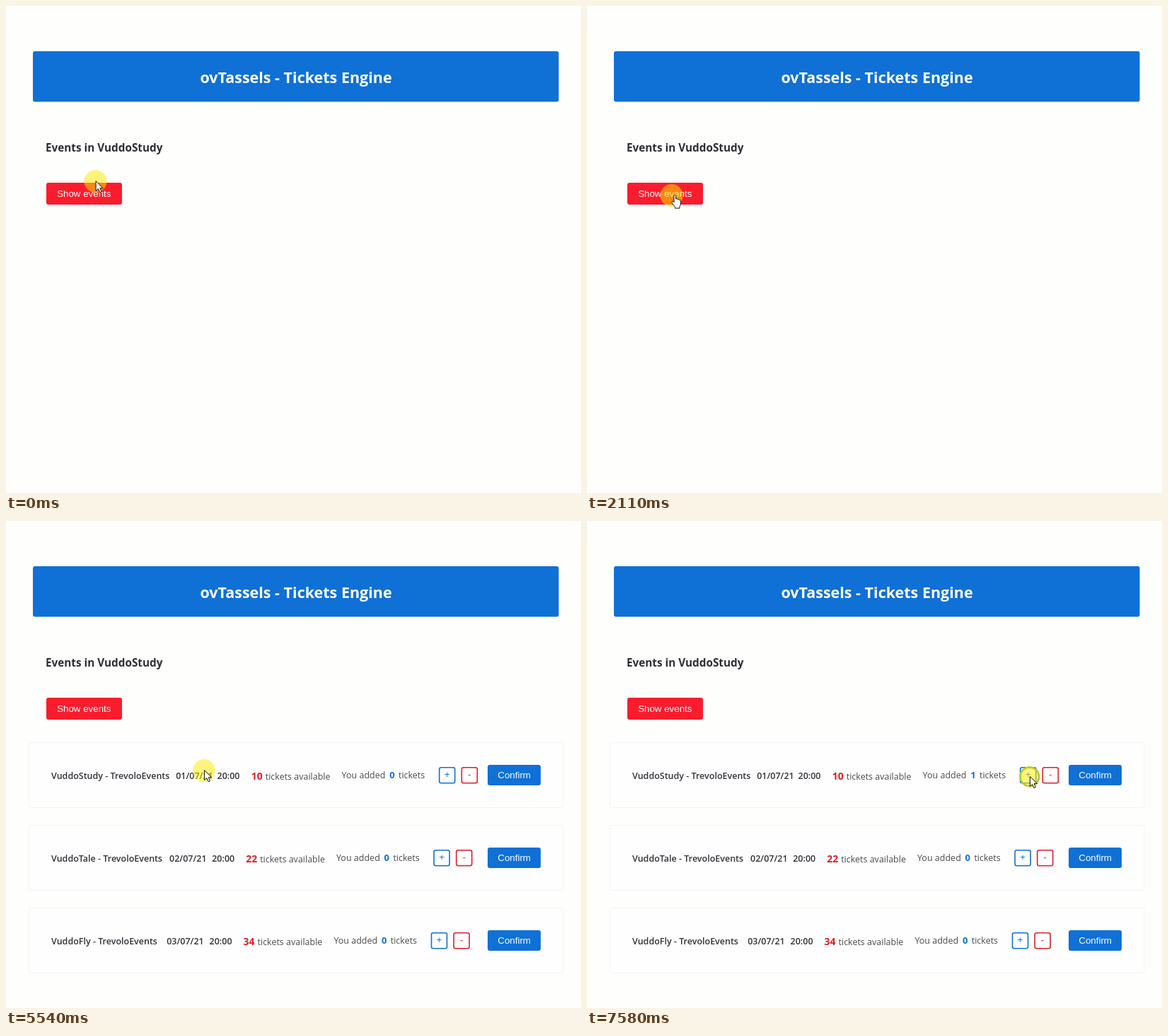
An HTML page for the animation above (8 s loop, 813 by 689 pixels).

```html
<!DOCTYPE html>
<html lang="en">
<head>
<meta charset="utf-8">
<title>Tickets</title>
<style>
html, body { margin: 0; width: 100%; height: 100%; overflow: hidden; background: #fefefd; }
svg { display: block; width: 813px; height: 689px; }
text { font-family: "Open Sans", "Noto Sans", sans-serif; font-size: 12.5px; fill: #484a4e; white-space: pre; }
.title { font-size: 21.5px; font-weight: 700; fill: #fff; text-anchor: middle; }
.head { font-size: 15.3px; font-weight: 700; fill: #2d2f35; }
.name { font-weight: 600; fill: #303238; }
.left { font-size: 14px; font-weight: 700; fill: #de1f26; }
.count { font-size: 13px; font-weight: 700; fill: #1070d3; }
.btn { font: 13.33px "Liberation Sans", Arial, sans-serif; fill: #fff; text-anchor: middle; }
</style>
</head>
<body>
<svg id="stage" viewBox="0 0 813 689">
  <rect width="813" height="689" fill="#fefefd"/>
  <rect x="38" y="64" width="743.5" height="71.6" rx="3" fill="#0f70d6"/>
  <text class="title" x="410" y="109">ovTassels - Tickets Engine</text>
  <text class="head" x="56" y="206">Events in VuddoStudy</text>
  <rect x="57" y="250" width="107" height="31" rx="3" fill="#f91c2d"/>
  <text class="btn" x="110.3" y="269.5">Show events</text>
  <g id="list"></g>
  <g id="pointer">
    <circle id="halo" r="16" fill="#ffe900" fill-opacity=".52"/>
    <circle id="ring" r="13.3" fill="none" stroke="#b4c92c" stroke-width="2.6"/>
    <path id="arrow" transform="translate(.6 -.4)" fill="#fff" stroke="#111" stroke-width="1"
      d="M0 0V14L3.2 11L5.5 16.2L7.9 15.2L5.7 10.2H10Z"/>
    <path id="hand" transform="translate(-1 -1.2)" fill="#fff" stroke="#111" stroke-width="1" stroke-linejoin="round"
      d="M4.3 1.6Q4.5 .5 5.6 .5T7 1.6V6.2Q8.9 5.4 9.6 6.8Q11.2 6.2 11.8 7.6Q13.6 7.2 13.7 9V13.4Q13.5 15.6 12.2 17V19.3H5.8V17.6Q3.6 15.2 1.4 11.6Q.6 10 2 9.6Q3.2 9.6 4.3 11Z"/>
  </g>
</svg>
<script>
const LOOP = 8000, LIST_AT = 3890, ADD_AT = 7580;
const BLUE = '#1070d3', RED = '#dc202c';
const $ = id => document.getElementById(id);

// start time, x, y, cursor shape
const moves = [
  [0, 126.5, 248, 'arrow'],
  [530, 126.5, 249.7, 'arrow'],
  [660, 132, 268, 'hand'],
  [1650, 131, 267.5, 'hand'],
  [1980, 126, 268, 'hand'],
  [2110, 119.7, 268, 'hand'],
  [5540, 280, 353, 'arrow'],
  [6330, 628, 361, 'arrow'],
  [6990, 625.8, 361.8, 'arrow']
];

// name, date, time, tickets left, x of date, x of time, shift of the right part
const events = [
  ['VuddoStudy', '01/07/21', '20:00', 10, 240.2, 298.5, 0],
  ['VuddoTale', '02/07/21', '20:00', 22, 231, 291.2, -7.6],
  ['VuddoFly', '03/07/21', '20:00', 34, 227.2, 287.6, -11.2]
];

const text = (cls, x, y, str, extra = '') =>
  `<text class="${cls}" x="${x}" y="${y}" ${extra}>${str}</text>`;

const stepper = (x, sign, color) =>
  `<rect x="${x}" y="348.8" width="22" height="22" rx="2.5" fill="#fefefe" stroke="${color}" stroke-width="1.6"/>` +
  text('btn', x + 11, 363, sign, `style="fill:${color}"`);

const card = ([name, date, time, left, dateX, timeX, dx], i) =>
  `<g transform="translate(0 ${i * 117})">
    <rect x="32" y="313.5" width="756" height="92" rx="3" fill="#fefefe" stroke="#f4f4f4"/>
    ${text('name', 64, 365, name + ' - TrevoloEvents')}
    ${text('name', dateX, 365, date)}
    ${text('name', timeX, 365, time)}
    <g transform="translate(${dx} 0)">
      ${text('left', 346.8, 366, left)}
      ${text('', 366.8, 365.7, 'tickets available')}
      ${text('', 474.6, 364.3, 'You added')}
      ${text('count', 542.2, 364.3, 0)}
      ${text('', 555, 364.3, 'tickets')}
      ${stepper(612.7, '+', BLUE)}
      ${stepper(644.3, '-', RED)}
    </g>
    <rect x="681" y="345" width="75" height="29" rx="3" fill="#0f70d6"/>
    ${text('btn', 718.6, 363.6, 'Confirm')}
  </g>`;

$('list').innerHTML = events.map(card).join('');
const added = document.querySelector('.count');
const show = (id, on) => $(id).setAttribute('visibility', on ? 'visible' : 'hidden');

function draw(t) {
  const [, x, y, shape] = moves.filter(m => m[0] <= t).pop();
  const clicked = t >= ADD_AT;
  $('pointer').setAttribute('transform', `translate(${x} ${y})`);
  show('arrow', shape === 'arrow');
  show('hand', shape === 'hand');
  show('ring', clicked);
  $('halo').setAttribute('r', clicked ? 14.5 : 16);
  show('list', t >= LIST_AT);
  added.textContent = clicked ? 1 : 0;
}

const start = performance.now();
function tick() {
  draw((performance.now() - start) % LOOP);
  requestAnimationFrame(tick);
}
tick();
</script>
</body>
</html>
```
